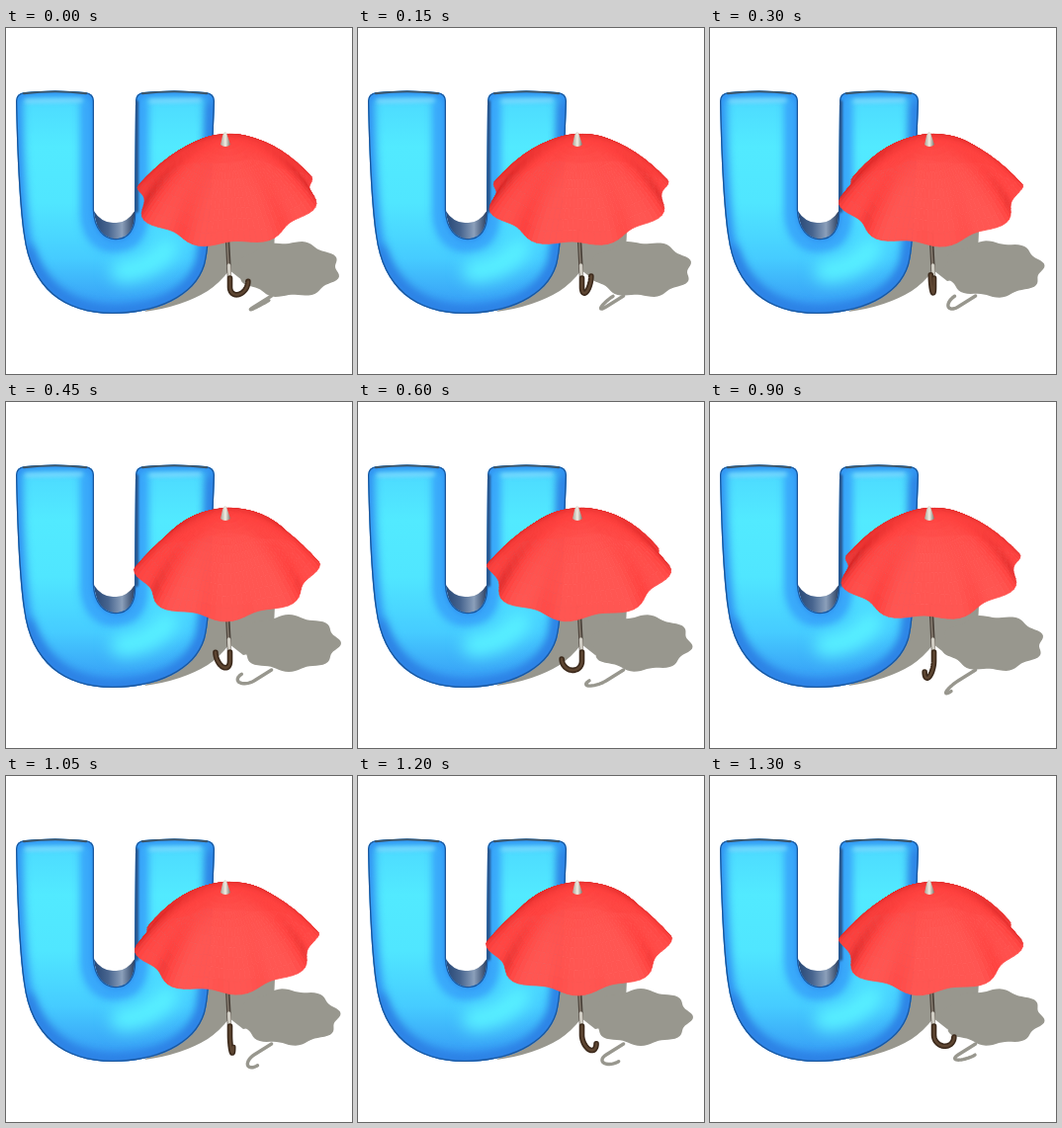
An HTML page with a canvas that plays this animation: 350x350 px, repeating every 1.4 s.

```html
<!DOCTYPE html>
<html lang="en">
<head>
<meta charset="utf-8">
<title>U is for umbrella</title>
<style>
  html, body { margin: 0; width: 100%; height: 100%; overflow: hidden; background: #fff; }
  canvas { display: block; width: 350px; height: 350px; }
</style>
</head>
<body>
<canvas id="stage" width="350" height="350"></canvas>
<script>
const ctx = document.getElementById('stage').getContext('2d');
const LOOP = 1400, TAU = 2 * Math.PI, RIBS = 8, RADIUS = 94, DROP = 54;
const SHADOW = '#98978e';
const { sin, cos, hypot } = Math;

function stroke(path, color, width, blur = 0) {
  ctx.filter = blur ? `blur(${blur}px)` : 'none';
  ctx.strokeStyle = color;
  ctx.lineWidth = width;
  ctx.lineCap = ctx.lineJoin = 'round';
  ctx.stroke(typeof path === 'string' ? new Path2D(path) : path);
  ctx.filter = 'none';
}
function fill(path, color) {
  ctx.fillStyle = color;
  ctx.fill(typeof path === 'string' ? new Path2D(path) : path);
}
function gradient(g, ...stops) {
  stops.forEach((c, i) => g.addColorStop(i / (stops.length - 1), c));
  return g;
}
function polygon(points) {
  const path = new Path2D();
  points.forEach(p => path.lineTo(...p));
  path.closePath();
  return path;
}

const letter = new Path2D('M10 74 Q10 66 19 65 Q50 62 80 65 Q89 66 89 74 L89 184 ' +
  'C90 204 100 213 111 213 C123 213 130 204 130 188 L131 74 Q131 66 139 65 Q170 62 202 65 ' +
  'Q211 66 211 74 L208 150 C206 192 206 222 201 240 C191 272 152 289 108 289 ' +
  'C58 289 25 263 18 210 C13 175 11 120 10 74 Z');

function drawLetter() {
  fill('M88 184 Q97 198 110 197 Q122 198 131 184 L131 204 L112 216 L94 207 Z',
    gradient(ctx.createLinearGradient(90, 0, 131, 0), '#2a4a78', '#48658f', '#8b9fba', '#253a5c'));
  ctx.save();
  ctx.clip(letter);
  fill(letter, gradient(ctx.createLinearGradient(0, 64, 0, 289), '#4cd8ff', '#52eaff', '#50e6ff', '#46ccff', '#3596f4'));
  stroke(letter, '#2f8ff2', 13, 4);
  stroke('M80 76 L80 190 Q84 222 111 222 Q137 222 139 190 L139 76', '#369ffa', 9, 4);
  stroke('M207 78 Q206 190 198 238 Q180 285 108 287 Q45 284 23 225', '#2c7fe2', 11, 5);
  stroke('M118 246 Q146 244 163 224', '#58f0ff', 24, 8);
  stroke('M20 74 L76 73 M146 74 L196 73', '#8fe0ff', 3, 2);
  stroke(letter, '#1c579c', 2.6, .7);
  stroke('M18 66 Q50 62 81 66 M138 66 Q170 62 203 66', '#3e5668', 2.5, .6);
  stroke('M132 75 L132 185', '#28558c', 4, 1);
  ctx.restore();
}

// Handle in its own plane: u is the distance from the shaft, h the height on screen.
function hookPath(project) {
  const path = new Path2D();
  path.moveTo(...project(0, 253));
  for (let i = 0; i <= 20; i++) {
    const a = Math.PI * i / 20;
    path.lineTo(...project(10.3 - 10.3 * cos(a), 262 + 10.3 * sin(a)));
  }
  return path;
}

// Cloth radius at an angle: full at the ribs, drawn in between them towards the rim.
function reach(a, s, turn) {
  return RADIUS * s * (1 - .11 * s * s * sin((a + turn) * RIBS / 2) ** 2);
}

function cloth(a, s, turn) {
  const r = reach(a, s, turn), x = r * cos(a), z = r * sin(a), drop = DROP * s * s;
  return {
    x, z, y: -1.25 * drop,
    screen: [223.5 + x, 113 + drop + z * (z > 0 ? .585 : .37) - .03 * x]
  };
}

function drawCanopy(turn) {
  const cols = 96, rows = 12, cells = [];
  for (let i = 0; i < cols; i++) {
    // Start on a rib so that the creases stay sharp.
    const a = i / cols * TAU - turn, b = a + TAU / cols;
    for (let j = 0; j < rows; j++) {
      const s = j / rows, e = (j + 1) / rows;
      cells.push({ z: sin((a + b) / 2) * (s + e), q: [cloth(a, s, turn), cloth(a, e, turn), cloth(b, e, turn), cloth(b, s, turn)] });
    }
  }
  cells.sort((m, n) => m.z - n.z);
  for (const { q } of cells) {
    const [p, o, n, m] = q;
    const ux = n.x - p.x, uy = n.y - p.y, uz = n.z - p.z;
    const vx = m.x - o.x, vy = m.y - o.y, vz = m.z - o.z;
    const nx = uy * vz - uz * vy, ny = uz * vx - ux * vz, nz = ux * vy - uy * vx;
    const flip = ny < 0 ? -1 : 1;
    const light = flip * (.08 * nx + .5 * ny + .86 * nz) / (hypot(nx, ny, nz) || 1);
    const k = Math.max(0, Math.min(1, .2 + .85 * light));
    const color = `rgb(${205 + 50 * Math.min(1, k * 1.5)},${30 + 56 * k},${30 + 52 * k})`;
    const shape = polygon(q.map(c => c.screen));
    fill(shape, color);
    stroke(shape, color, .8);
  }
  fill('M217 118 L219 109 Q222 101 224 109 L227 118 Q222 122 217 118 Z',
    gradient(ctx.createLinearGradient(217, 0, 227, 0), '#a8a295', '#f1eee4', '#7c756b'));
}

function drawGround(turn) {
  const side = cos(turn), back = sin(turn);
  fill('M140 287 Q178 282 204 266 Q216 258 226 245 L240 256 L270 250 L272 205 L203 205 L190 250 Z', SHADOW);
  const rim = [];
  for (let a = 0; a < TAU; a += TAU / 96) {
    const r = reach(a, 1, turn) / RADIUS;
    rim.push([286 + 53 * r * cos(a), 244 + 29 * r * sin(a)]);
  }
  fill(polygon(rim), SHADOW);
  const cast = (u, h) => [
    251 - .8 * (h - 262) + u * (.83 * side - .04 * back),
    282 + .5 * (h - 262) - u * (.08 * side + .54 * back)
  ];
  const path = hookPath(cast);
  path.moveTo(...cast(0, 253));
  path.lineTo(...cast(0, 240));
  stroke(path, SHADOW, 3.4);
}

function drawHandle(turn) {
  const path = hookPath((u, h) => [226.5 + u * cos(turn), h - .6 * u * sin(turn)]);
  stroke('M223.5 205 L226 252', '#4d443c', 4.4);
  stroke('M223.2 205 L225.6 250', '#8b8074', 1.4);
  stroke('M225.5 240 L226.2 252', '#d1cec5', 3.4);
  stroke(path, '#3c2a1c', 5.6);
  stroke(path, '#5e4632', 2.4);
}

function draw(time) {
  const t = time % LOOP;
  const step = t >= 1300 ? 9 : Math.min(8, Math.floor(t / 150));
  const turn = (27 + 36 * step) * TAU / 360;
  ctx.fillStyle = '#fff';
  ctx.fillRect(0, 0, 350, 350);
  drawGround(turn);
  drawLetter();
  drawHandle(turn);
  drawCanopy(turn);
}

let start = null, shown = -1;
function tick(now) {
  if (start === null) start = now;
  draw(now - start);
  requestAnimationFrame(tick);
}
draw(0);
requestAnimationFrame(tick);
</script>
</body>
</html>
```
